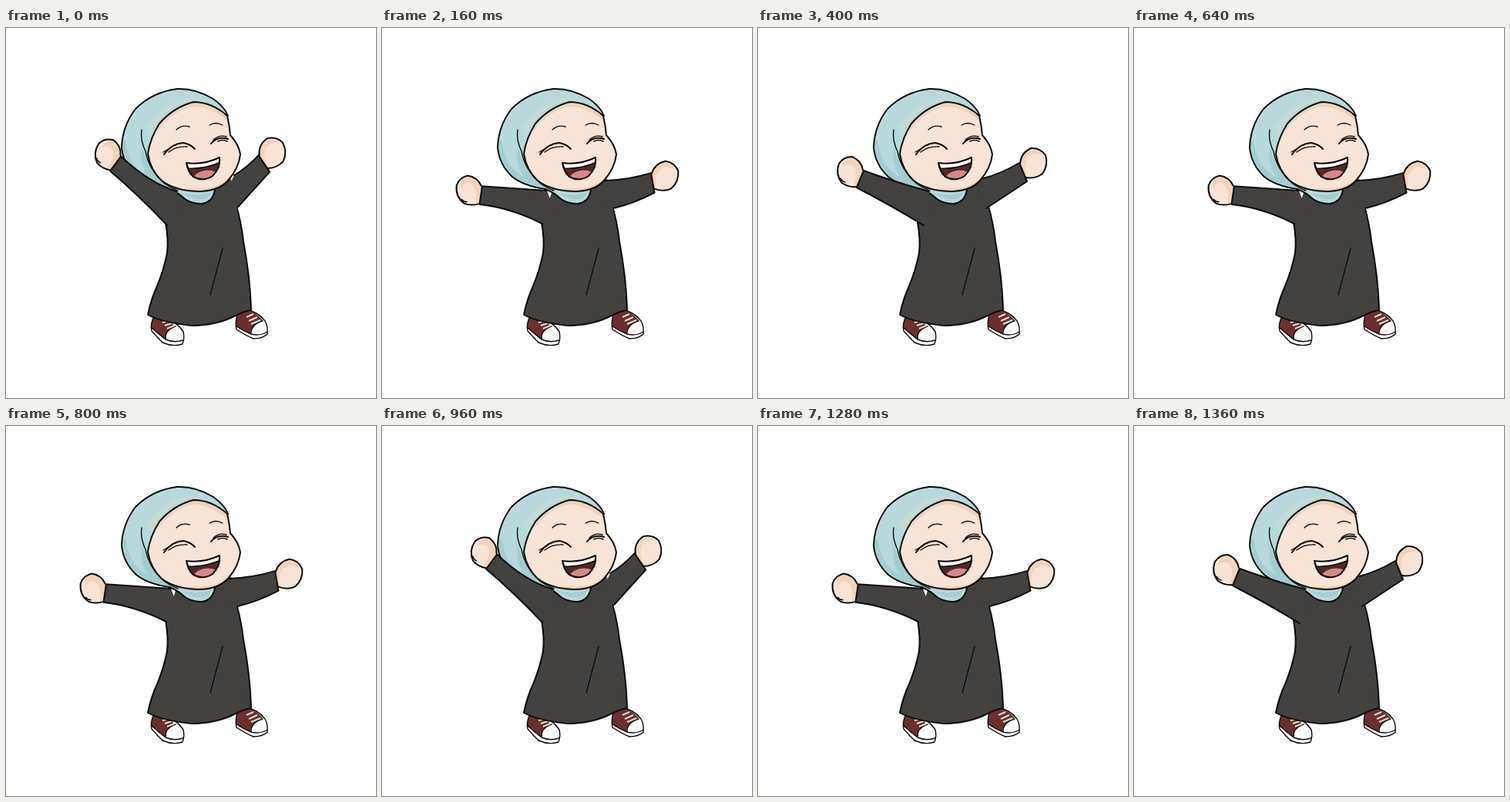
These frames come from a looping animation (480 by 480 pixels, 1440 ms). An HTML page:

```html
<!DOCTYPE html>
<html lang="en">
<head>
<meta charset="utf-8">
<title>Cheering girl</title>
<style>
html, body { margin: 0; width: 100%; height: 100%; overflow: hidden; background: #fff; }
svg { display: block; width: 100vw; height: 100vh; }
.line { fill: none; stroke: #0b0b0b; stroke-width: 2; stroke-linecap: round; stroke-linejoin: round; }
.thin { stroke-width: 1.4; }
.cloth { fill: #434241; }
.skin { fill: #f8e4d6; }
.blush { fill: #f3d3ba; }
</style>
</head>
<body>
<svg viewBox="0 0 480 480">
  <defs>
    <clipPath id="faceClip"><use href="#face"/></clipPath>
    <clipPath id="scarfClip"><use href="#scarf"/></clipPath>
    <clipPath id="mouthClip"><use href="#mouth"/></clipPath>
  </defs>

  <g id="shoes">
    <path fill="#fff" d="M191 375 Q187 386 189 393 Q196 401 203 408 Q216 414 229 410 Q232 403 230 394 Q222 384 212 378Z"/>
    <path fill="#6b302e" d="M191 375 Q188 383 189 389 Q198 397 207 404 Q207 393 219 388 L211 377Z"/>
    <path class="line thin" d="M191 376 Q187 386 189 393 Q196 401 203 408 Q216 414 229 410 Q232 403 230 394 Q224 385 216 381 M189 389 Q198 397 207 404 Q218 409 230 405 M207 403 Q206 391 220 387"/>
    <path fill="none" stroke="#ead9cd" stroke-width="2" d="M203 382 L211 380 M206 386 L215 383 M209 390 L219 386"/>
    <path fill="#fff" d="M300 371 Q297 383 299 391 Q311 399 321 403 Q333 403 339 397 Q340 387 336 380 Q328 371 316 366Z"/>
    <path fill="#6b302e" d="M300 371 Q298 380 299 387 Q308 393 317 397 Q317 386 333 379 Q326 370 314 366Z"/>
    <path class="line thin" d="M300 372 Q297 383 299 391 Q311 399 321 403 Q333 403 339 397 Q340 387 336 380 Q329 371 318 367 M299 387 Q308 393 318 397 Q330 400 339 394 M318 397 Q317 385 333 380"/>
    <path fill="none" stroke="#ead9cd" stroke-width="2" d="M312 375 L321 371 M315 380 L326 375 M318 384 L330 379"/>
  </g>

  <path class="cloth" d="M207 252 Q211 275 209 292 Q205 313 196 335 Q188 352 184 372 Q202 382 240 386 Q272 386 296 374 Q307 368 318 366 Q317 325 308 277 Q305 250 298 232 L292 196 L222 208Z"/>
  <path class="line" d="M207 252 Q211 275 209 292 Q205 313 196 335 Q188 352 184 372 Q202 382 240 386 Q272 386 296 374 Q307 368 318 366 Q317 325 308 277 Q305 250 298 228"/>
  <path class="line thin" d="M281 286 Q274 312 265 346"/>

  <path id="scarf" fill="#b7d9dc" d="M288 114 Q284 103 269 92 Q246 78 222 79 Q190 83 168 105 Q151 127 150 155 Q152 177 169 193 Q184 205 212 209 Q224 214 231 221 Q240 228 253 228 Q268 227 271 210 L290 195Z"/>
  <g clip-path="url(#scarfClip)">
    <path fill="#a4cdd1" d="M150 150 Q153 190 190 204 L230 212 Q202 204 188 183 Q180 166 176 154 Q173 178 184 193 Q160 182 155 145Z"/>
    <path fill="#c9d9d2" d="M184 128 Q197 107 220 95 Q240 87 261 94 Q229 91 210 108 Q196 120 188 140Z"/>
    <path fill="#a4cdd1" d="M229 214 Q249 220 268 212 L260 221 Q243 225 229 214Z"/>
  </g>
  <path class="line" d="M288 114 Q284 103 269 92 Q246 78 222 79 Q190 83 168 105 Q151 127 150 155 Q152 177 169 193 Q184 205 212 209 Q224 214 231 221 Q240 228 253 228 Q268 227 271 210"/>
  <path class="line thin" d="M176 132 Q174 146 181 160 Q185 184 206 202 Q213 207 223 211"/>

  <path id="face" class="skin" d="M287 114 Q267 96 243 96 Q217 103 199 124 Q187 143 184 163 Q187 184 202 198 Q219 211 249 212 Q275 212 288 198 Q302 182 304 164 Q302 151 291 139 Q290 127 287 114Z"/>
  <g clip-path="url(#faceClip)">
    <path class="blush" d="M287 114 Q267 96 243 96 Q217 103 199 124 L197 133 Q217 107 243 102 Q266 102 286 120Z"/>
    <path class="blush" d="M304 158 Q299 189 279 202 Q260 211 230 207 L250 215 L290 206 L306 178Z"/>
  </g>
  <path class="line" d="M287 114 Q267 96 243 96 Q217 103 199 124 Q187 143 184 163 Q187 184 202 198 Q219 211 249 212 Q275 212 288 198 Q302 182 304 164 Q302 151 291 139 Q290 127 287 114"/>

  <path class="line thin" d="M221 132 Q228 125 238 128 M264 126 Q272 121 281 126"/>
  <path class="line" d="M205 164 Q215 150 230 149 Q240 151 245 157 M266 150 Q274 140 288 144"/>
  <path class="line thin" d="M204 161 L214 155 M211 161 Q221 153 235 154 M269 145 Q277 138 286 141 M275 147 Q281 144 287 147"/>

  <path id="mouth" fill="#562625" d="M234 175 Q256 178 277 168 Q279 181 268 192 Q256 200 243 193 Q236 187 234 175Z"/>
  <g clip-path="url(#mouthClip)">
    <ellipse cx="258" cy="193" rx="15" ry="8" fill="#d18b89" transform="rotate(-13 258 193)"/>
    <path class="line thin" fill="#fff" style="fill:#fff" d="M233 174 Q256 178 278 167 L276 175 Q256 183 237 182Z"/>
  </g>
  <path class="line" d="M234 175 Q256 178 277 168 Q279 181 268 192 Q256 200 243 193 Q236 187 234 175Z"/>

  <g id="leftHand">
    <path class="skin" d="M137 185 Q134 172 122 167 Q111 167 105 176 Q100 190 109 201 Q117 207 129 206Z"/>
    <path class="blush" d="M136 185 Q133 173 122 168 Q111 169 109 181 Q117 174 124 179 Q130 187 124 205 L129 206Z"/>
    <path class="line" d="M136 184 Q134 172 122 167 Q111 167 105 176 Q100 190 109 201 Q117 207 129 206"/>
    <path class="line thin" d="M107 195 Q109 199 113 200"/>
  </g>
  <g id="rightHand">
    <path class="skin" d="M340 176 Q341 162 354 156 Q366 155 373 165 Q377 178 369 189 Q360 196 347 194Z"/>
    <path class="blush" d="M340 176 Q342 164 354 158 Q364 157 369 164 Q355 161 349 169 Q343 180 350 194 L347 194Z"/>
    <path class="line" d="M340 176 Q341 162 354 156 Q366 155 373 165 Q377 178 369 189 Q360 196 347 194"/>
  </g>
  <path id="leftFill" class="cloth"/>
  <path id="leftLine" class="line"/>
  <path id="rightFill" class="cloth"/>
  <path id="rightLine" class="line"/>
</svg>
<script>
const STEP = 80, LOOP = 1440;
const swing = [0, 1, 2, 3, 2, 1]; // arms raised to lowered and back

const arms = [
  {
    name: "left", pivot: [216, 224], top: [137, 185], low: [128, 207],
    angles: [14.5, 0, -14, -28],
    upEnd: [[222, 212], [222, 212], [214, 211], [214, 211]],
    lowEnd: [[209, 256], [215, 256], [208, 254], [208, 261]],
    upBow: [6, 1, 0, -4], lowBow: [-2, -1, -4, -2],
    inner: [225, 240]
  },
  {
    name: "right", pivot: [284, 227], top: [339, 175], low: [349, 199],
    angles: [-11.5, 0, 12.5, 25],
    upEnd: [[296, 191], [292, 195], [289, 198], [289, 198]],
    lowEnd: [[301, 232], [296, 234], [300, 234], [301, 239]],
    upBow: [2, 2, 2, -2], lowBow: [0, 0, 2, 0],
    inner: [280, 225]
  }
];

const el = id => document.getElementById(id);

function turn([x, y], [cx, cy], deg) {
  const a = deg * Math.PI / 180, c = Math.cos(a), s = Math.sin(a);
  return [cx + (x - cx) * c - (y - cy) * s, cy + (x - cx) * s + (y - cy) * c];
}

// Quadratic segment whose middle is shifted down by bow
function bend(a, b, bow) {
  return `Q${(a[0] + b[0]) / 2} ${(a[1] + b[1]) / 2 + bow * 2} ${b}`;
}

function drawArm(arm, pose) {
  const deg = arm.angles[pose];
  const top = turn(arm.top, arm.pivot, deg);
  const low = turn(arm.low, arm.pivot, deg);
  const up = arm.upEnd[pose], under = arm.lowEnd[pose];
  const edge = `M${up}${bend(up, top, arm.upBow[pose])}L${low}${bend(low, under, arm.lowBow[pose])}`;
  el(arm.name + "Fill").setAttribute("d", edge + `L${arm.inner}Z`);
  el(arm.name + "Line").setAttribute("d", edge);
  el(arm.name + "Hand").setAttribute("transform", `rotate(${deg} ${arm.pivot})`);
}

function render(ms) {
  const pose = swing[Math.floor(ms % LOOP / STEP) % swing.length];
  arms.forEach(arm => drawArm(arm, pose));
}

const start = performance.now();
function tick() {
  render(performance.now() - start);
  requestAnimationFrame(tick);
}
tick();
</script>
</body>
</html>
```
